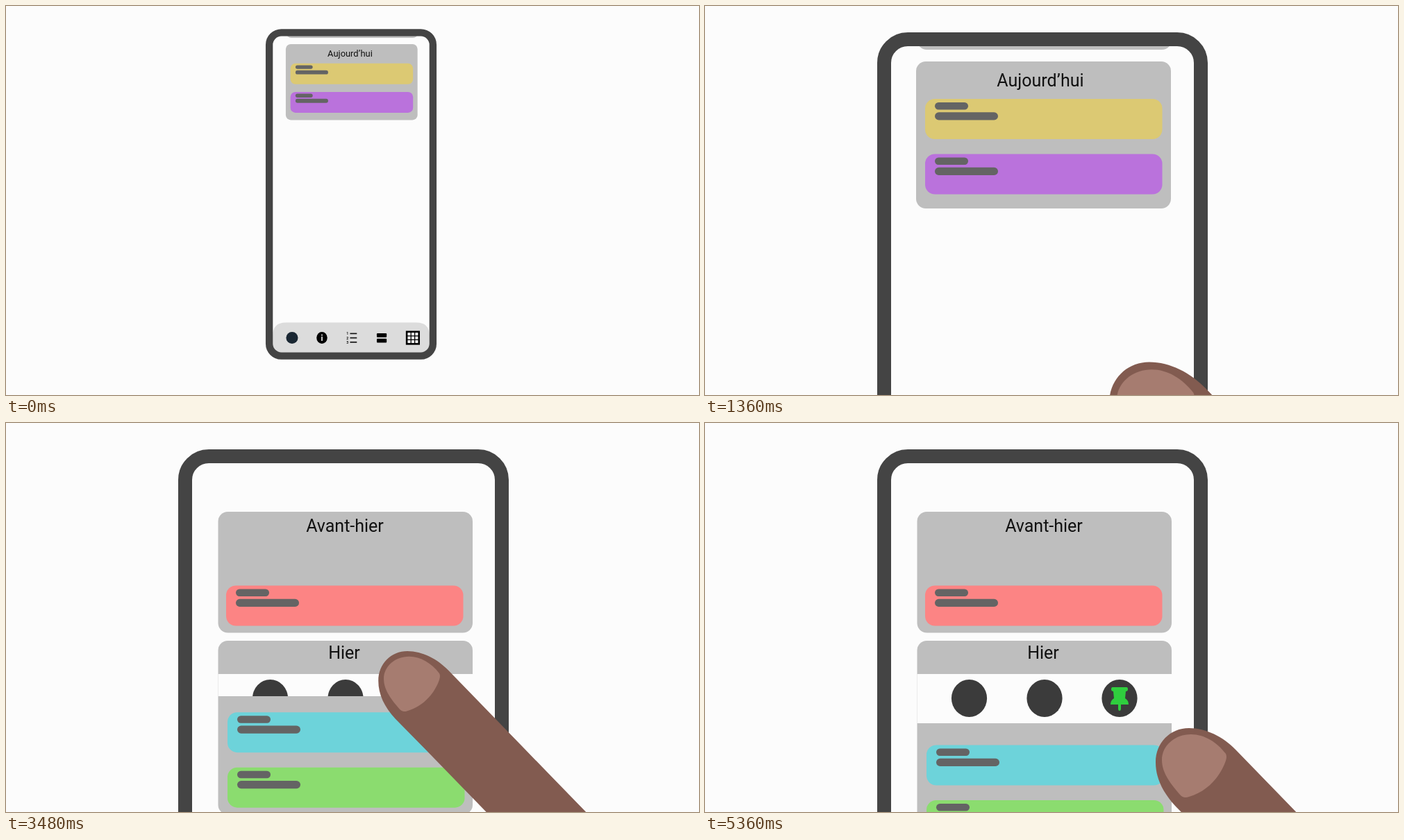
Write an HTML page that moves like this. It is 998x561 px and loops after 6760 ms.

```html
<!DOCTYPE html>
<html lang="fr">
<head>
<meta charset="utf-8">
<style>
  html, body { margin: 0; width: 100%; height: 100%; overflow: hidden; background: #fcfcfc; }
  svg { display: block; width: 998px; height: 561px; }
  text { font: 25px Roboto, "Noto Sans", sans-serif; text-anchor: middle; fill: #111; }
</style>
</head>
<body>
<svg id="stage" viewBox="0 0 998 561"></svg>
<script>
const LOOP = 6760, STEP = 40;
const SCROLL = 463, PANEL = 71, PUSH = 86;

const rect = (x, y, w, h, r, fill) =>
  `<rect x="${x}" y="${y}" width="${w}" height="${h}" rx="${r}" fill="${fill}"/>`;
const label = (x, y, s) => `<text x="${x}" y="${y}">${s}</text>`;
const item = (x, y, fill) => rect(x, y, 341.5, 58, 14, fill) +
  rect(x + 14, y + 5, 48, 10.5, 5.2, '#646464') +
  rect(x + 14, y + 19.3, 91, 11.2, 5.6, '#646464');
const disc = x => `<ellipse cx="${x}" cy="397" rx="25.6" ry="27" fill="#3b3b3b"/>`;
const rows = f => [0, 1, 2].map(f).join('');

const navIcons =
  `<circle cx="321.5" cy="899.5" r="16.5" fill="#1a2733"/>
   <ellipse cx="404.7" cy="899.5" rx="15" ry="16.5"/>` +
  rect(403, 896, 3.5, 12, 0, '#ddd') + rect(403, 889.5, 3.5, 4, 1, '#ddd') +
  rows(i => rect(483, 886 + i * 12, 19, 3.2, 0, '#111') +
    `<text x="476" y="${891.5 + i * 12}" style="font-size:10px;font-weight:700">${i + 1}</text>`) +
  rect(557.5, 887, 27.5, 11, 2, '#000') + rect(557.5, 902, 27.5, 11, 2, '#000') +
  rect(638.5, 880, 39, 39, 0, '#000') +
  rows(r => rows(c => rect(643.5 + c * 10.5, 885 + r * 10.5, 8, 8, 0, '#f4f4f4')));

const pin = `<path id="pin" d="M587 381h20q2 0 2 3t-3 3l-1 10q5 3 5 9h-11v6q0 3-2 3t-2-3v-6h-11
  q0-6 5-9l-1-10q-3 0-3-3t2-3z"/>`;

stage.innerHTML = `
<defs>
  <clipPath id="screen"><rect x="267" y="57" width="438" height="884" rx="25"/></clipPath>
  <clipPath id="open"><rect id="slot" x="305" y="362" width="368" height="0"/></clipPath>
</defs>
<g id="phone">
  <g clip-path="url(#screen)">
    <g id="list">
      ${rect(305.5, 128, 366.5, 174.5, 14, '#bebebe')}
      ${label(488, 156.5, 'Avant-hier')}
      ${item(317, 234.5, '#fc8484')}
      <rect id="card" x="305.5" y="314" width="366.5" height="212" rx="14" fill="#bebebe"/>
      ${label(487, 339.5, 'Hier')}
      <g clip-path="url(#open)">
        ${rect(305.5, 362, 366.5, PANEL, 0, '#fcfcfc')}
        ${disc(380.5)}${disc(489)}${disc(597)}${pin}
      </g>
      <g id="pushed">
        ${item(319, 378.5, '#6dd3da')}
        ${item(319, 458, '#8bdc6f')}
        ${rect(304, 543, 367, 212, 14, '#bebebe')}
        ${label(483, 578.5, 'Aujourd’hui')}
        ${item(317, 597, '#dcc973')}
        ${item(317, 676.5, '#ba72dc')}
      </g>
    </g>
    <path d="M268 940V893q0-36 36-36H668q36 0 36 36V940z" fill="#dcdcdc"/>
    ${navIcons}
  </g>
  <rect x="258" y="48" width="456" height="902" rx="34" fill="none" stroke="#444" stroke-width="20"/>
</g>
<g id="finger">
  <path fill="#825b50" d="M68 32C50 13 25 0 0 0C-27 0-48 21-48 49C-48 72-38 92-20 112L30 163L530 678H695L195 163z"/>
  <path fill="#a67c70" d="M53 37C40 20 22 9 3 9C-20 9-39 25-39 46C-39 66-24 83-13 96Q-8 102 0 99
    C28 91 46 68 53 47Q55 41 53 37z"/>
</g>`;

// time, x and y of the fingertip, size
const poses = [
  [1320, 645, 562, 1.26], [1820, 611, 246, .87], [1860, 611, 246, .87],
  [1960, 606, 316, .87], [2000, 604, 358, .93], [2080, 600, 398, 1],
  [2480, 600, 398, 1], [2880, 577, 322, 1], [3080, 578, 329, .87],
  [3800, 578, 329, .87], [4120, 697, 440, 1], [4640, 697, 440, 1],
  [4960, 627, 370, 1], [5000, 628, 377, .87], [5040, 627, 370, 1],
  [5360, 697, 440, 1], [LOOP, 697, 440, 1]
];

const el = id => document.getElementById(id);
const set = (id, name, value) => el(id).setAttribute(name, value);
const mix = (a, b, p) => a + (b - a) * p;
const part = (t, from, to) => Math.min(1, Math.max(0, (t - from) / (to - from)));

function fingerAt(t) {
  const i = Math.max(1, poses.findIndex(p => p[0] >= t));
  const a = poses[i - 1], b = poses[i];
  let p = part(t, a[0], b[0]);
  if (i === 1) p = 1 - (1 - p) ** 2; // slows down as it reaches the screen
  return a.map((v, k) => mix(v, b[k], p));
}

function draw(t) {
  const zoom = part(t, 0, 1040), move = zoom ** 1.54;
  set('phone', 'transform', `translate(${mix(497, 486, move)} ${mix(271.5, 499, move)})
    scale(${mix(.517, 1, zoom ** 2)}) translate(-486 -499)`);

  const scroll = part(t, 1860, 2240) ** 2;
  set('list', 'transform', `translate(0 ${SCROLL * (scroll - 1)})`);

  const open = part(t, 3120, 3920);
  set('slot', 'height', PANEL * open);
  set('card', 'height', 212 + PUSH * open);
  set('pushed', 'transform', `translate(0 ${PUSH * open})`);
  set('pin', 'fill', t < 5000 ? '#fcfcfc' : '#2fce3e');

  const [, x, y, size] = fingerAt(t);
  set('finger', 'transform', `translate(${x} ${y}) scale(${size})`);
}

const start = performance.now();
function tick() {
  const t = (performance.now() - start) % LOOP;
  draw(Math.floor(t / STEP) * STEP);
  requestAnimationFrame(tick);
}
tick();
</script>
</body>
</html>
```
